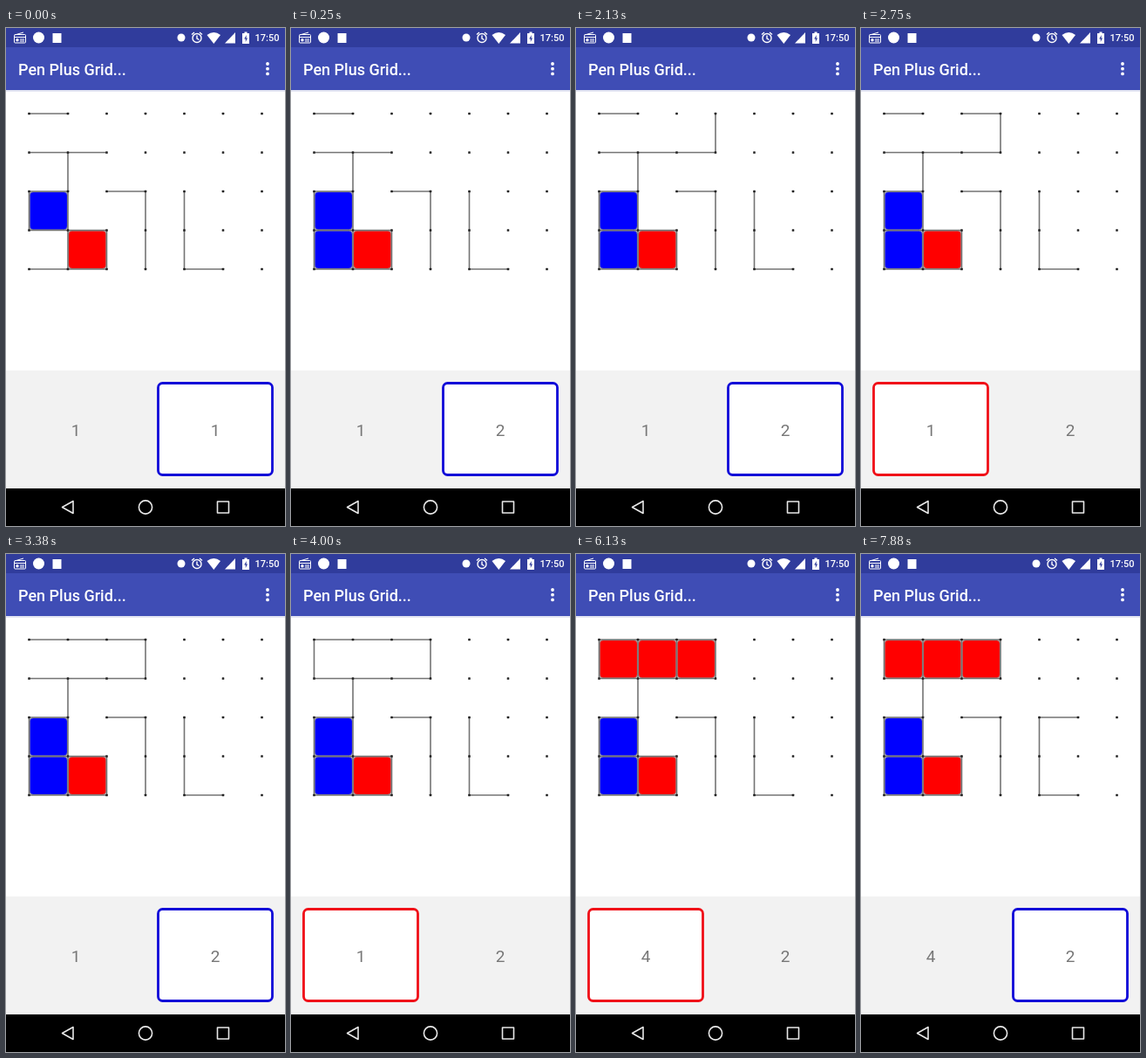
Animation, 320 px wide and 570 px high, one loop 8 s. Source, as an HTML page:

```html
<!DOCTYPE html>
<html lang="en">
<head>
<meta charset="utf-8">
<title>Pen Plus Grid</title>
<style>
  html, body { margin: 0; width: 100%; height: 100%; overflow: hidden; background: #fff; }
  svg { display: block; width: 100%; height: 100%; }
  text { font-family: Roboto, sans-serif; }
  .score { font-size: 19px; fill: #777; text-anchor: middle; }
  .card { fill: #fff; stroke-width: 2.8; }
  #lines { stroke: #737373; stroke-width: 1.6; }
  #boxes { stroke: #999; stroke-width: .8; }
</style>
</head>
<body>
<svg viewBox="0 0 320 570">
  <rect width="320" height="570" fill="#fff"/>
  <rect y="71" width="320" height="2" fill="#e4e6f3"/>
  <rect y="22" width="320" height="49" fill="#3f4db5"/>
  <rect width="320" height="22" fill="#303c9c"/>

  <!-- status bar and title -->
  <g fill="#fff">
    <path d="M10 8 20 5M10 10.5H22M16 13H21M16 15H21" stroke="#fff"/>
    <rect x="9.5" y="7.5" width="13" height="9.5" rx="1" fill="none" stroke="#fff"/>
    <circle cx="13" cy="13.8" r="1.7"/>
    <circle cx="37.5" cy="11" r="6.5"/>
    <rect x="53.5" y="6" width="10" height="11"/>
    <circle cx="201" cy="11" r="4.5"/>
    <g fill="none" stroke="#fff" stroke-width="1.4">
      <circle cx="219" cy="11.5" r="5"/>
      <path d="M219 8.5V12L221.5 13.5M213 7.5 216 5M225 7.5 222 5"/>
    </g>
    <path d="M230.5 8Q238.5 2 246 8L238.3 18Z"/>
    <path d="M251 17.5 263 5V17.5Z"/>
    <path d="M271 6H273.5V4.5H276.5V6H279V18H271Z"/>
    <path d="M275.8 8 273.2 12.5H274.8V16L277 11.5H275.5Z" fill="#303c9c"/>
    <text x="285.5" y="15" font-size="11" font-weight="500">17:50</text>
    <text x="14" y="53.5" font-size="18" font-weight="500">Pen Plus Grid...</text>
    <path d="M300 41h0m0 5.7h0m0 5.7h0" stroke="#fff" stroke-width="3.8" stroke-linecap="round"/>
  </g>

  <g id="boxes"></g>
  <g id="lines"></g>
  <g id="dots" fill="#222"></g>

  <rect y="392" width="320" height="135" fill="#f2f2f2"/>
  <g id="cards"></g>

  <!-- navigation bar -->
  <rect y="527" width="320" height="43"/>
  <g fill="none" stroke="#e8e8e8" stroke-width="1.6" stroke-linejoin="round">
    <path d="M64.5 548.5 77 541.5V555.5Z"/>
    <circle cx="160" cy="548.5" r="7.6"/>
    <rect x="242.5" y="542" width="13" height="13"/>
  </g>
</svg>
<script>
const LOOP = 8000, STEP = 44.5, COLS = 7, ROWS = 5;
const players = [{ fill: "#f00", edge: "#f00f18" }, { fill: "#00f", edge: "#1008d8" }];
const px = col => 26.5 + col * STEP, py = row => 98 + row * STEP;

function add(layer, tag, attrs) {
  const el = document.createElementNS("http://www.w3.org/2000/svg", tag);
  for (const key in attrs) el.setAttribute(key, attrs[key]);
  document.getElementById(layer).append(el);
  return el;
}

for (let row = 0; row < ROWS; row++)
  for (let col = 0; col < COLS; col++)
    add("dots", "rect", { x: px(col) - 1.3, y: py(row) - 1.3, width: 2.6, height: 2.6, rx: .6 });

players.forEach((player, i) => {
  const x = 14.5 + 160 * i;
  player.card = add("cards", "rect",
    { class: "card", x, y: 406.5, width: 131, height: 105, rx: 5, stroke: player.edge });
  player.label = add("cards", "text", { class: "score", x: x + 65.5, y: 466.5 });
});

// Strokes by time: first dot (column, row), then right, down or left
const game = {
  0: "00R 02DRRDLL 02R 11DD 22RDD 13D 01RR 42DDR",
  130: "03D", 1380: "21R", 1880: "30D", 2750: "20R", 3000: "10R",
  3880: "00D", 5000: "10D", 5630: "20D", 7750: "42R"
};
const timed = [], states = [], edges = new Set(), owned = new Set();
let turn = 0, points = [0, 0];

const closed = (col, row) =>
  [[col, row, "R"], [col, row + 1, "R"], [col, row, "D"], [col + 1, row, "D"]]
    .every(edge => edges.has(edge.join("")));

// Draw one edge, claim the boxes it closes; a move that closes none passes the turn
function play(col, row, dir, time) {
  const [dx, dy] = dir === "R" ? [1, 0] : [0, 1];
  edges.add(`${col}${row}${dir}`);
  timed.push({ time, el: add("lines", "line",
    { x1: px(col), y1: py(row), x2: px(col + dx), y2: py(row + dy) }) });

  let gained = 0;
  for (const [c, r] of [[col, row], [col - dy, row - dx]]) {
    if (!closed(c, r) || owned.has(`${c}${r}`)) continue;
    owned.add(`${c}${r}`);
    gained++;
    timed.push({ time, el: add("boxes", "rect", { x: px(c) + .6, y: py(r) + .6,
      width: STEP - 1.2, height: STEP - 1.2, rx: 4, fill: players[turn].fill }) });
  }
  points = points.map((n, i) => i === turn ? n + gained : n);
  if (!gained) turn = 1 - turn;
  states.push({ time, turn, points });
}

for (const [time, strokes] of Object.entries(game))
  for (const stroke of strokes.split(" ")) {
    let [col, row, ...dirs] = stroke;
    col = +col;
    row = +row;
    for (const dir of dirs) {
      if (dir === "L") play(--col, row, "R", +time);
      else {
        play(col, row, dir, +time);
        if (dir === "R") col++; else row++;
      }
    }
  }

const start = performance.now();

function draw(now) {
  const t = Math.max(0, now - start) % LOOP;
  const state = states.filter(s => s.time <= t).pop();
  for (const { el, time } of timed) el.style.display = t >= time ? "" : "none";
  players.forEach(({ card, label }, i) => {
    card.style.display = i === state.turn ? "" : "none";
    label.textContent = state.points[i];
  });
  requestAnimationFrame(draw);
}
draw(start);
</script>
</body>
</html>
```
